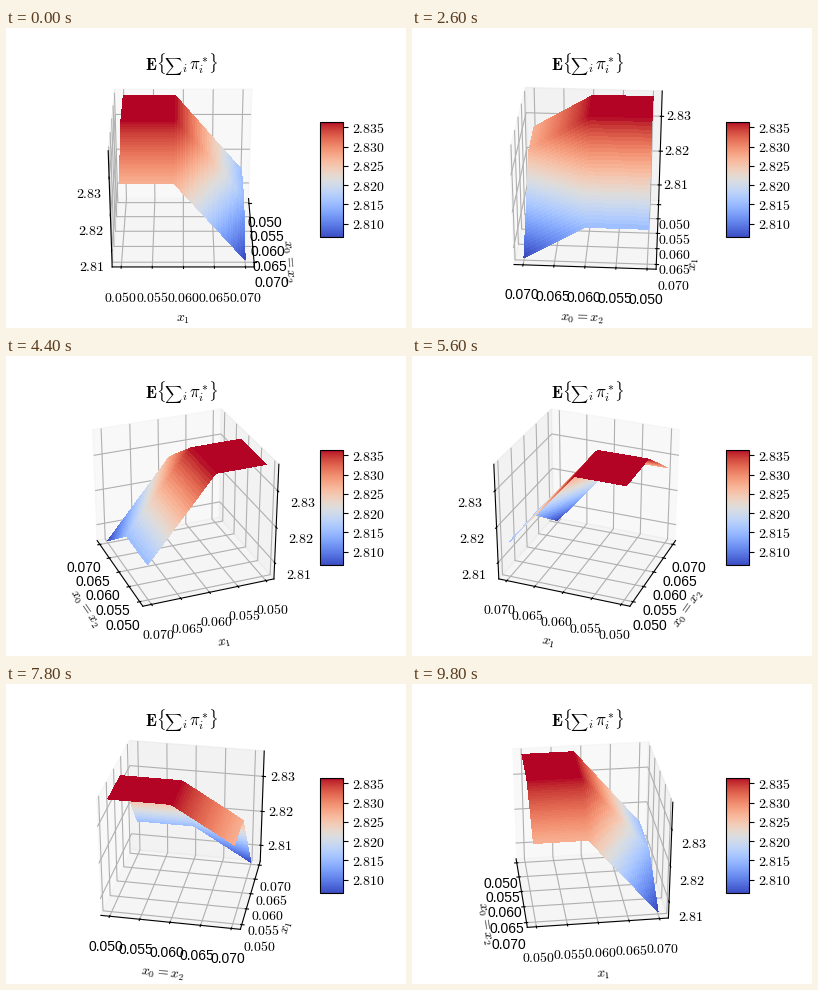
Write a matplotlib script that moves like this. It is 400 px wide and 300 px high and loops after 10 s.

```python
import numpy as np
import matplotlib.pyplot as plt
from matplotlib.animation import FuncAnimation

FRAMES = 50
INTERVAL = 200
STEP = 360 / FRAMES

plt.rcParams["mathtext.fontset"] = "cm"


def padded(lo, hi):
    """Bounds with the small gap between the data limits and the panes."""
    gap = (hi - lo) / 48
    return lo - gap, hi + gap


def tex(values, digits):
    return [f"${v:.{digits}f}$" for v in values]


fig = plt.figure(figsize=(4, 3), dpi=100)
ax = fig.add_subplot(projection="3d")

# Piecewise linear profit surface: a plateau falling off past two thresholds
grid = np.linspace(0.05, 0.07, 50)
X, Y = np.meshgrid(grid, grid)
Z = 2.83643 - 0.93 * np.maximum(0, X - 0.06) - 1.864 * np.maximum(0, Y - 0.0586)

surf = ax.plot_surface(X, Y, Z, rstride=1, cstride=1, cmap="coolwarm",
                       linewidth=0, antialiased=False)

ax.set_xlim(*padded(0.049, 0.071))
ax.set_ylim(*padded(0.049, 0.071))
ax.set_zlim(*padded(Z.min(), Z.max()))

# A unit cube that fills the whole, slightly wide, axes rectangle
ax.set_box_aspect((1, 1, 1), zoom=3 ** 0.5 / 1.8294640721620434)
ax.apply_aspect = lambda position=None: None

ticks = np.linspace(0.05, 0.07, 5)
zticks = [2.81, 2.82, 2.83]
ax.set_xticks(ticks, labels=[f"{v:.3f}" for v in ticks],
              fontfamily="Liberation Sans")
ax.set_yticks(ticks, labels=tex(ticks, 3))
ax.set_zticks(zticks, labels=tex(zticks, 2))
ax.set_xlabel("$x_0 = x_2$")
ax.set_ylabel("$x_1$")

bar = fig.colorbar(surf, ax=ax, shrink=0.5, aspect=5)
levels = np.linspace(2.81, 2.835, 6)
bar.set_ticks(levels, labels=tex(levels, 3))

# The title is set in parts so that the sum sign has its inline size
TITLE = [(139, r"\mathbf{E}", 12), (150.5, r"\{", 12), (158.5, r"{\sum}", 8.6),
         (176, r"{}_i", 12), (183, r"\pi_i^*", 12), (201.5, r"\}", 12)]
for x, part, size in TITLE:
    fig.text(x / 400, 258 / 300, f"${part}$", fontsize=size,
             ha="left", va="baseline")


def update(i):
    # The tiny nudge settles which side pane shows in head-on views
    azim = STEP * i
    ax.view_init(elev=30, azim=azim + 1e-4 * np.cos(np.radians(azim)))
    return []


anim = FuncAnimation(fig, update, frames=FRAMES, interval=INTERVAL,
                     init_func=lambda: update(0), repeat=True, repeat_delay=0)

plt.show()
```
